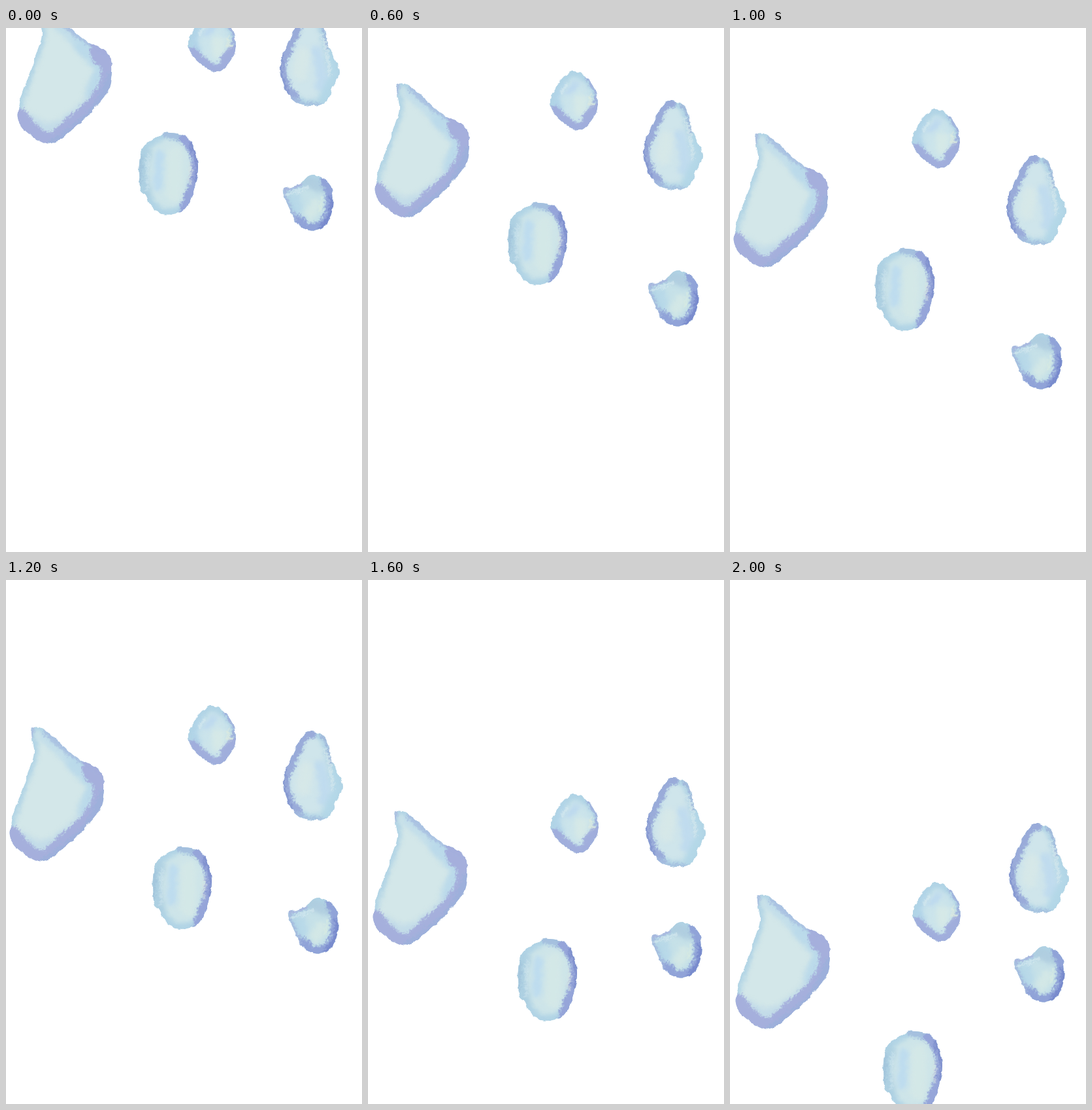
Write an HTML page that moves like this. It is 545 by 800 pixels and loops after 2.2 s.

```html
<!DOCTYPE html>
<html lang="en">
<head>
<meta charset="utf-8">
<title>Falling drops</title>
<style>
  html, body { margin: 0; width: 100%; height: 100%; overflow: hidden; background: #fff; }
  svg { display: block; width: 545px; height: 800px; }
  path { stroke-linecap: round; stroke-linejoin: round; }
</style>
</head>
<body>
<svg id="stage" viewBox="0 0 545 800">
  <defs>
    <filter id="rough" filterUnits="userSpaceOnUse" x="0" y="0" width="545" height="800" color-interpolation-filters="sRGB">
      <feTurbulence type="fractalNoise" baseFrequency=".09" numOctaves="2" seed="4"/>
      <feDisplacementMap in="SourceGraphic" scale="6" xChannelSelector="R" yChannelSelector="G"/>
    </filter>
    <filter id="soft" filterUnits="userSpaceOnUse" x="0" y="0" width="545" height="800" color-interpolation-filters="sRGB">
      <feGaussianBlur stdDeviation="3.5"/>
    </filter>
    <filter id="grain" filterUnits="userSpaceOnUse" x="0" y="0" width="545" height="800" color-interpolation-filters="sRGB">
      <feGaussianBlur stdDeviation="1.5" result="paint"/>
      <feTurbulence type="fractalNoise" baseFrequency=".3" numOctaves="2" seed="9"/>
      <feDisplacementMap in="paint" scale="11" xChannelSelector="R" yChannelSelector="G"/>
    </filter>
  </defs>
</svg>
<script>
const STEP = 200, STEPS = 11, REST = 4, TURN = 5;
const stage = document.getElementById('stage');

// early / late: pixels moved per step before and after the turn.
// Strokes are [points, colour, width, opacity].
const drops = [
  {
    early: [-2.5, 37.7], late: [.75, 64], fill: '#d3e7e9',
    outline: '40,129 53,123 75,137 108,168 143,187 152,209 147,245 128,271 95,302 60,327 30,316 9,293 12,262 32,203 45,162',
    rim: 12,
    soft: [
      ['110,175 140,210 128,250', '#b9d9ea', 34, .9],
      ['128,262 92,295 55,312 18,294', '#bcd8e9', 30, .7],
      ['58,138 95,170', '#c0dcea', 14, .8]
    ],
    grain: [
      ['66,130 95,155 143,187', '#a9bfe1', 14, .85],
      ['135,186 152,209 147,245 128,271 95,302 60,327 30,316 9,291', '#a4addc', 35, .95],
      ['152,225 130,272 95,305 60,329', '#9bb0db', 14, .7],
      ['40,136 42,125', '#a9b9df', 7, .8]
    ]
  },
  {
    early: [0, 29.4], late: [.2, 67.6], fill: '#cbe4eb',
    outline: '299,105 315,95 337,106 350,128 349,158 327,185 306,178 286,160 279,143 283,126',
    rim: 17,
    soft: [
      ['298,115 290,135 294,155', '#b2d4e9', 10, .9],
      ['318,114 306,128', '#b8d5ef', 8, .9],
      ['325,140 324,154', '#d6e9e7', 20, .9]
    ],
    grain: [
      ['338,106 350,128 349,158', '#9fb0dc', 8, .9],
      ['349,156 327,186 306,180 284,160', '#a0acdc', 25, .95],
      ['340,134 342,147', '#e0ebdd', 5, .8],
      ['304,116 296,127', '#d9ebf0', 3, .9]
    ]
  },
  {
    early: [.8, 42.4], late: [.75, 35.4], fill: '#cfe5eb',
    outline: '463,153 481,158 490,170 496,197 505,212 513,238 502,262 498,275 484,287 462,288 443,279 427,256 422,228 430,204 441,180 451,161',
    rim: 17,
    soft: [
      ['478,205 486,238 484,258', '#bad8ef', 16, .7],
      ['498,215 503,245 488,276', '#b4d7e8', 15, .9],
      ['458,210 453,240', '#d6e8e8', 22, .9]
    ],
    grain: [
      ['463,154 451,161 430,204 422,228 427,256 443,279', '#98a9d9', 20, .95],
      ['424,210 422,238 432,268', '#8294cf', 7, .8],
      ['443,281 462,289 480,288', '#a4bfdf', 10, .8],
      ['482,160 491,173 497,198', '#9eb3d9', 6, .9],
      ['485,180 494,205 498,242', '#dcebef', 3, .9]
    ]
  },
  {
    early: [3.75, 35.4], late: [2.4, 70.3], fill: '#cee5e9',
    outline: '252,305 266,302 291,308 303,325 309,353 305,380 297,406 282,423 255,426 237,413 229,398 219,384 220,340 229,319',
    rim: 18,
    soft: [
      ['230,330 225,360 230,398', '#accfe2', 14, .9],
      ['250,335 247,385', '#badaf0', 14, .8],
      ['273,335 272,395', '#d4e8e7', 24, .9]
    ],
    grain: [
      ['262,303 285,308 303,325', '#a3bddd', 16, .85],
      ['290,309 303,325 309,353 305,380 290,418', '#94a3d8', 20, .95],
      ['300,320 309,350 307,375', '#7f8fce', 8, .9],
      ['222,340 220,380', '#9fc0da', 5, .8],
      ['232,335 231,390', '#d3e9f0', 2.5, .8],
      ['298,350 297,378', '#dfe6e2', 3, .8]
    ]
  },
  {
    early: [1.4, 48.4], late: [.75, 18.5], fill: '#c6e1e8',
    outline: '430,440 443,437 457,432 469,420 482,419 499,430 506,445 505,474 496,494 483,503 464,501 449,488 437,464 433,454',
    rim: 18,
    soft: [
      ['468,429 492,438', '#aecddf', 17, .9],
      ['450,452 454,472', '#b5d7e9', 14, .8],
      ['480,463 472,478', '#d4e8e6', 18, .9]
    ],
    grain: [
      ['499,430 506,445 505,474 496,494 483,503 464,501 449,488', '#8fa1d7', 22, .95],
      ['506,455 504,478 490,500', '#7789cd', 10, .9],
      ['430,440 443,437 457,432', '#a8b4de', 6, .9],
      ['432,445 438,464 449,486', '#a2b5dd', 6, .8],
      ['437,447 452,443 468,437', '#d9ebf1', 3, .9],
      ['490,456 487,472', '#dcecdf', 4, .7]
    ]
  }
];

function add(parent, tag, attributes) {
  const node = document.createElementNS('http://www.w3.org/2000/svg', tag);
  for (const name in attributes) node.setAttribute(name, attributes[name]);
  return parent.appendChild(node);
}

// Catmull-Rom spline through the points, as cubic Béziers.
function spline(text, closed) {
  const points = text.split(' ').map(pair => pair.split(',').map(Number));
  const n = points.length;
  const at = i => points[closed ? (i + n) % n : Math.max(0, Math.min(n - 1, i))];
  let d = 'M' + points[0];
  for (let i = 0; i < (closed ? n : n - 1); i++) {
    const [a, b, c, e] = [at(i - 1), at(i), at(i + 1), at(i + 2)];
    const out = b.map((v, k) => v + (c[k] - a[k]) / 6);
    const into = c.map((v, k) => v - (e[k] - b[k]) / 6);
    d += `C${out} ${into} ${c}`;
  }
  return d + (closed ? 'Z' : '');
}

function build(drop, index) {
  const d = spline(drop.outline, true);
  const clip = add(stage.querySelector('defs'), 'clipPath', { id: 'clip' + index });
  add(clip, 'path', { d });

  drop.node = add(stage, 'g', {});
  const rough = add(drop.node, 'g', { filter: 'url(#rough)' });
  const body = add(rough, 'g', { 'clip-path': `url(#clip${index})` });
  add(body, 'path', { d, fill: drop.fill });

  for (const layer of ['soft', 'grain']) {
    const group = add(body, 'g', { filter: `url(#${layer})`, fill: 'none' });
    if (layer === 'soft') add(group, 'path', { d, stroke: '#b0d3e5', 'stroke-width': drop.rim });
    for (const [points, stroke, width, opacity] of drop[layer]) {
      add(group, 'path', { d: spline(points), stroke, 'stroke-width': width, opacity });
    }
  }
}

let shown = -1;
function frame() {
  const step = Math.floor(performance.now() / STEP) % STEPS;
  if (step !== shown) {
    shown = step;
    const before = Math.min(step, TURN) - REST, after = Math.max(0, step - TURN);
    for (const { node, early, late } of drops) {
      const [x, y] = early.map((v, k) => Math.round(v * before + late[k] * after));
      node.setAttribute('transform', `translate(${x} ${y})`);
    }
  }
  requestAnimationFrame(frame);
}

drops.forEach(build);
frame();
</script>
</body>
</html>
```
